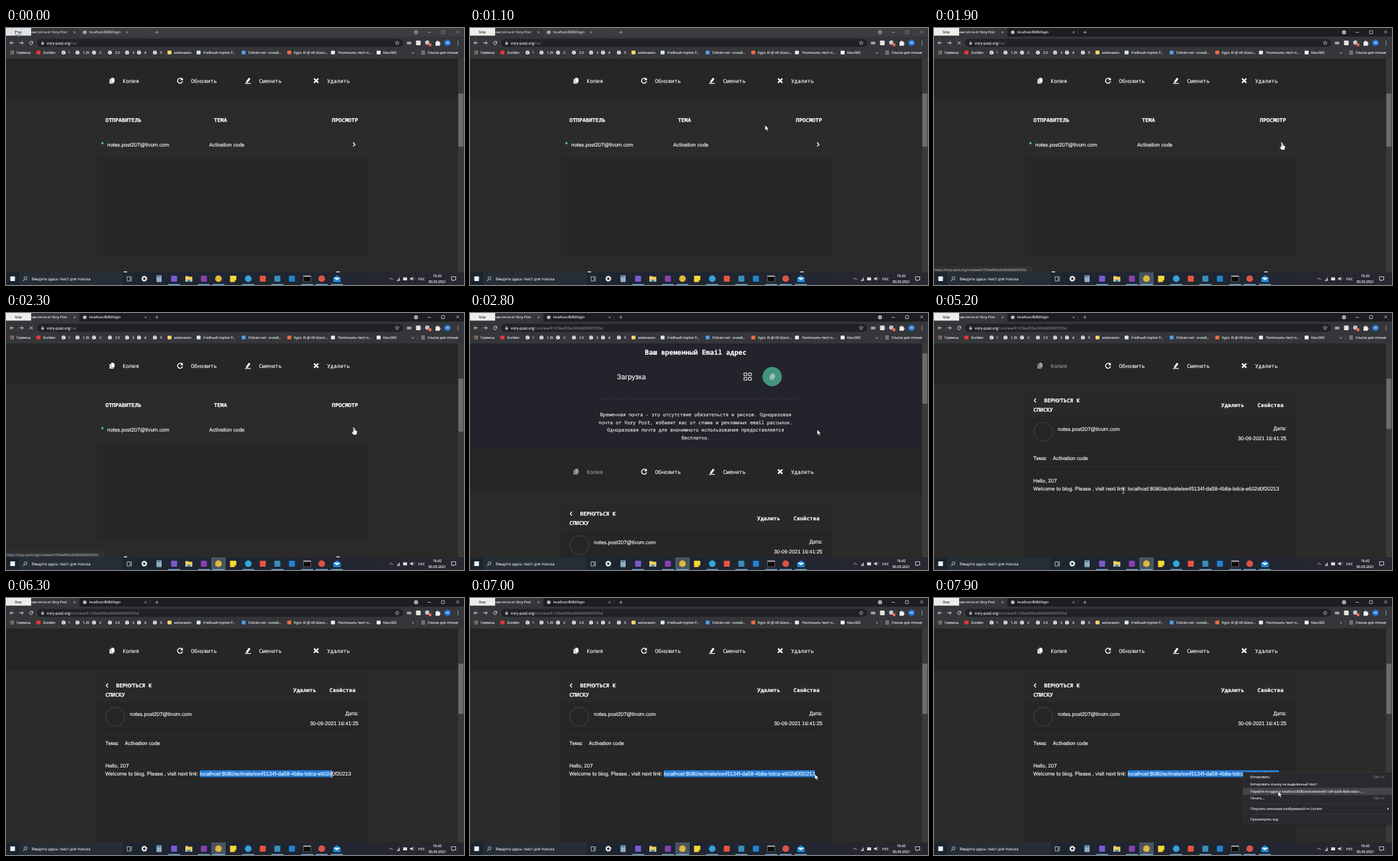
Write an HTML page that moves like this. It is 692x388 px and loops after 8 s.

```html
<!DOCTYPE html>
<html lang="ru">
<head>
<meta charset="utf-8">
<style>
html, body { margin: 0; width: 100%; height: 100%; overflow: hidden; background: #292928; }
svg { display: block; width: 692px; height: 388px; text-rendering: geometricPrecision; }
text { white-space: pre; }
.ui { font-family: "Open Sans", "Noto Sans", sans-serif; }
.mono { font-family: "Noto Sans Mono", "DejaVu Sans Mono", monospace; }
.sans { font-family: "Liberation Sans", Arial, sans-serif; }
</style>
</head>
<body>
<svg id="stage" viewBox="0 0 692 388"></svg>
<script>
const LOOP = 8000, ACTIVATE = 1700, LOADED = 2400, COPY_READY = 5900, MENU = 7500;
const VIEW = 'view/6155be850a365b003695355d';

const text = (font, size, fill, extra = '') => (x, y, str, more = '') =>
  `<text class="${font}" x="${x}" y="${y}" font-size="${size}" fill="${fill}" stroke="${fill}" stroke-width=".14" ${extra} ${more}>${str}</text>`;
const rect = (x, y, w, h, fill, r = 0, more = '') =>
  `<rect x="${x}" y="${y}" width="${w}" height="${h}" rx="${r}" fill="${fill}" ${more}/>`;
const dot = (x, y, r, fill, more = '') => `<circle cx="${x}" cy="${y}" r="${r}" fill="${fill}" ${more}/>`;
const line = (d, stroke = '#dfe1e5', w = 0.9, more = '') =>
  `<path d="${d}" fill="none" stroke="${stroke}" stroke-width="${w}" ${more}/>`;
const shape = (d, fill, more = '') => `<path d="${d}" fill="${fill}" ${more}/>`;
const group = (id, body, more = '') => `<g id="${id}" ${more}>${body}</g>`;
const cross = (x, y, r, color, w) =>
  line(`M${x - r} ${y - r}l${2 * r} ${2 * r}m0 ${-2 * r}l${-2 * r} ${2 * r}`, color, w);
const reload = (x, y, r, color, w) =>
  line(`M${x + r * .7} ${y - r * .7}A${r} ${r} 0 1 0 ${x + r} ${y + r * .2}`, color, w) +
  shape(`M${x + r * 1.1} ${y - r * 1.2}v${r * 1.1}h${-r * 1.1}z`, color);
const copyIcon = (x, y, color) =>
  shape(`M${x - 3.5} ${y - 2.5}h2v5.5h4v1.5h-6z`, color) +
  shape(`M${x - 1} ${y - 4.5}h3l2 2v5h-5z`, color);
const globe = (x, y) => dot(x, y, 3, '#eceef0') +
  line(`M${x - 2} ${y - 1.2}q1.6.2 1.6 1.6t1.4 1.6M${x + .4} ${y - 2.4}q.2 1.4 1.9 1.4`, '#4a4c50', .7);

const END = 'text-anchor="end"', MID = 'text-anchor="middle"';
const tab = text('ui', 5.05, '#e4e6e9');
const omni = text('ui', 5.75, '#e8eaed');
const mark = text('ui', 5, '#e8eaed');
const body = text('sans', 7.9, '#ffffff');
const head = text('mono', 8.2, '#ffffff', 'font-weight="700"');
const button = text('mono', 8.15, '#ffffff', 'font-weight="500"');
const item = text('ui', 5, '#e4e5e6');
const tray = text('ui', 5.3, '#f6f6f6');

function browser() {
  const bookmarks = [
    [49, 56, '#e33', 'Zuvideo'], [87, 94, '', '1'], [108, 116, '', '1.25'], [133, 141, '', '2'],
    [157, 165, '', '2.5'], [183, 191, '', '3'], [201, 209, '', '4'], [225, 233, '', '5'],
    [247, 254, '#f6d775', 'матанализ'], [291, 298, '#d9e4ef', 'Учебный портал Р...'],
    [359, 366, '#4a9cf0', 'Ostiven.net - онлай...'], [428, 435, '#e8703a', 'Курс: AI @ НК Школ...'],
    [494, 502, '#e9e9e9', 'Распознать текст о...'], [563, 570, '#f5f5f5', 'Kavu582']
  ];
  const apps = ['#e55', '#fb4', '#5b7', '#48e'];
  let s = rect(0, 0, 692, 14, '#1d1e21', 0, 'id="strip"') + rect(0, 0, 111, 14, '#35363a', 2) +
    rect(0, 13, 692, 33, '#35363a');
  s += group('tabs',
    tab(37, 8.2, 'ная почта от Vory-Post') + cross(103.5, 6.5, 1.5, '#ddd', .7) +
    dot(119, 6.5, 2.7, '#b9bcc0') + tab(126, 8.2, 'localhost:8080/login') +
    group('tabClose', cross(0, 6.5, 1.5, '#c8c8c8', .7)) +
    line('M217.5 3v7', '#55585d', .6) + line('M225.5 6.5h5m-2.5-2.5v5', '#ccc', .7));
  s += group('controls',
    dot(619.5, 6.5, 3, '#c9ccd0') + shape('M618 5.8h3l-1.5 2z', '#222') +
    line('M637 6.5h5M658 4h4.5v4.5h-4.5z', '#e6e6e6', .7) + cross(682.5, 6, 2.2, '#e6e6e6', .7));
  s += line('M12 22.5h-6m2.7-2.7l-2.7 2.7l2.7 2.7') + line('M20 22.5h6m-2.7-2.7l2.7 2.7l-2.7 2.7') +
    group('reload', reload(38, 22.5, 2.5, '#dfe1e5', .9)) + group('halt', cross(38, 22.5, 2.3, '#dfe1e5', .9)) +
    rect(47, 16.5, 553, 12, '#202124', 6) +
    rect(53.3, 21.8, 4, 3.4, '#aaa', .4) + line('M54.2 22v-1a1.1 1.1 0 0 1 2.2 0v1', '#aaa', .6) +
    omni(61.5, 24.7, 'vory-post.org<tspan fill="#9aa0a6" stroke="none">/ru/<tspan id="path"></tspan></tspan>') +
    line('M591 19.5l.9 2h2.1l-1.6 1.4l.6 2.1l-2-1.2l-2 1.2l.6-2.1l-1.6-1.4h2.1z', '#d8dadd', .6) +
    shape('M605.5 21.5q3.5-2 7 0v1.8l-1.4 1.7h-1.4l-.7-1.2l-.7 1.2h-1.4l-1.4-1.7z', '#a5a69f') +
    rect(619.5, 19, 7, 7, '#e4e4e1', 1) +
    dot(636.5, 22, 3.2, '#c5c8cc') + rect(638, 23, 5, 4.5, '#d63a38', 1) + tab(639.3, 26.9, '5') +
    shape('M649 20.5h2a1.2 1.2 0 0 1 2.4 0h2v2a1.2 1.2 0 0 1 0 2.4v1.8h-6.4z', '#f0f1f3') +
    dot(667, 22.5, 4.9, '#1e6fd0') + tab(667, 24.2, 'dd', MID);
  for (let i = 0; i < 3; i++) s += dot(683, 20 + i * 2.5, .65, '#ddd');
  for (let i = 0; i < 9; i++) s += rect(6.3 + i % 3 * 2.1, 34.3 + (i / 3 | 0) * 2.1, 1.5, 1.5, apps[i % 4]);
  s += mark(16, 38.9, 'Сервисы');
  for (const [x, tx, color, label] of bookmarks)
    s += (color ? rect(x - 3, 34.3, 6, 5.4, color, .8) : globe(x, 37)) + mark(tx, 38.9, label);
  return s + mark(613.5, 38.9, '»') + line('M622 33v8', '#5c5f64', .6) +
    line('M627.5 34.8h5.5m-5.5 2.2h5.5m-5.5 2.2h5.5', '#ddd', .8) + mark(637, 38.9, 'Список для чтения');
}

function toolbar() {
  return rect(0, 46, 683, 62, '#252525') + rect(142, 66, 396, 28, '#262626') +
    group('copy', copyIcon(160, 79.5, '#fff') + button(176.4, 82.5, 'Копия')) +
    reload(263, 79.5, 3.8, '#fff', 1.4) + button(279.4, 82.5, 'Обновить') +
    shape('M363 80.5l4-5.5l2.4 1.7l-4 5.5l-2.6 1z', '#fff') + line('M361 83.7h9', '#fff', 1.1) +
    button(382.2, 82.5, 'Сменить') +
    cross(468.7, 79.5, 3.3, '#fff', 2.2) + button(485.2, 82.5, 'Удалить');
}

function inbox() {
  return rect(0, 108, 683, 262, '#2a2a29') + rect(138, 195, 410, 150, '#272727') +
    line('M142 119.5h403', '#3a3a39', .6, 'stroke-dasharray="2 2"') +
    head(150.3, 141.7, 'ОТПРАВИТЕЛЬ') + head(314.3, 141.7, 'ТЕМА') + head(492.5, 141.7, 'ПРОСМОТР') +
    rect(142, 157, 403, 38, '#2b2b2a') + rect(144, 172.3, 3.3, 3.3, '#4bb79f', 1) +
    body(153, 178.8, 'notes.post207@tivum.com') + body(307, 178.8, 'Activation code') +
    line('M524.4 172.7l3 3l-3 3', '#fff', 1.3) +
    line('M142 345.5h403', '#343433', .6) + rect(178, 367.5, 5, 2, '#ddd') + rect(499, 367.5, 5, 2, '#ddd');
}

function message() {
  return rect(0, 108, 683, 262, '#2b2b29') + rect(137, 112, 410, 258, '#292928') + rect(137, 157, 410, 213, '#262627') +
    line('M154 129l-2.6 3l2.6 3', '#fff', 1.2) + head(166.3, 134.8, 'ВЕРНУТЬСЯ К') + head(150.3, 148.8, 'СПИСКУ') +
    head(434, 141.8, 'Удалить') + head(488.8, 141.8, 'Свойства') +
    dot(165, 179.3, 14.3, '#252526', 'stroke="#4a4a4a" stroke-width=".9"') +
    body(187, 177.8, 'notes.post207@tivum.com') + body(532.5, 177, 'Дата:', END) +
    body(532.5, 191.8, '30-09-2021 16:41:25', END) +
    line('M150 207.5h383M150 232.5h383', '#343434', .7) +
    body(150, 222.4, 'Тема:') + body(179.5, 222.4, 'Activation code') + body(150, 255.7, 'Hello, 207') +
    rect(293, 260, 0, 10.5, '#1f78d6', 0, 'id="selection"') +
    body(150, 267.6, 'Welcome to blog. Please , visit next link: localhost:8080/activate/ee45134f-da58-4b8a-bdca-e602d0f20213');
}

function hero() {
  const small = text('mono', 7.2, '#f0f0ec', MID);
  const title = text('mono', 10.25, '#fff', 'font-weight="700" ' + MID);
  const copyLines = [
    'Временная почта - это отсутствие обязательств и рисков. Одноразовая',
    'почта от Vory Post, избавит вас от спама и рекламных email рассылок.',
    'Одноразовая почта для анонимного использования предоставляется', 'бесплатно.'
  ];
  let s = rect(0, 46, 683, 160, '#23232c') + title(341, 63, 'Ваш временный Email адрес') +
    text('sans', 10.8, '#fff')(222, 99.6, 'Загрузка');
  for (const [x, y] of [[414, 90.5], [420.8, 90.5], [414, 97.3], [420.8, 97.3]])
    s += rect(x, y, 4.2, 4.2, 'none', .6, 'stroke="#eee" stroke-width="1.1"');
  s += dot(456.5, 96, 14.6, '#43947d') + copyIcon(456.5, 96, '#a9c9bd') +
    line('M195 130h300', '#41414a', .7, 'stroke-dasharray="5 3"');
  copyLines.forEach((str, i) => s += small(341, 155.7 + i * 11.8, str));
  return s;
}

function taskbar() {
  const icons = [
    [254, '#7a5bd0'], [299, '#8a3fb0'], [321, '#e0b83c', 1], [366, '#35a4de', 1], [388, '#e8553a'],
    [410, '#3a8fb8'], [432, '#2483d0'], [477, '#dc5543', 1]
  ];
  let s = '<linearGradient id="bar"><stop stop-color="#1a2530"/><stop offset=".65" stop-color="#202631"/>' +
    '<stop offset="1" stop-color="#2a2730"/></linearGradient>' +
    rect(0, 369, 692, 19, 'url(#bar)') + rect(20, 369, 156, 19, '#262d36') + rect(6.5, 375, 7, 7, '#f4f4f4') +
    dot(29.5, 377.8, 2.3, 'none', 'stroke="#ddd" stroke-width=".8"') + line('M28 379.8l-2.3 2.3', '#ddd', .9) +
    text('ui', 5.8, '#d0d3d6')(39, 380.8, 'Введите здесь текст для поиска') +
    line('M183 375.5h4.5v6.5h-4.5zM189.5 375v7.5', '#ddd', .8) +
    dot(209, 378.5, 2.8, 'none', 'stroke="#fff" stroke-width="1.8"') +
    dot(209, 378.5, 4, 'none', 'stroke="#fff" stroke-width="1" stroke-dasharray="1.57 1.57"') +
    rect(310, 369, 22, 19, '#485462', 0, 'id="focus"');
  for (const [x, color, round] of icons)
    s += round ? dot(x, 378.5, 5, color) : rect(x - 4.5, 374, 9, 9, color, 1);
  // calculator, folder, note, console, mail
  s += rect(227.5, 373.5, 7.5, 10, '#a9c4d8', .5) + rect(228.5, 374.5, 5.5, 2, '#3c6f9c') +
    line('M228.7 378.5h5.5M228.7 380.5h5.5M228.7 382.3h5.5', '#4c6d87', .8, 'stroke-dasharray="1.2 .8"') +
    shape('M271 374.5h4l1 1h5.5v7.5h-10.500z', '#f4cd62') + rect(273.5, 380, 5.500, 3, '#3f92d6') +
    shape('M338.500 374h9.500v6l-3 3.500h-6.500z', '#f8d636') + shape('M348 380h-3v3.500z', '#b99b1c') +
    rect(449.5, 374, 11, 9, '#0c0c0c', 0, 'stroke="#9a9a9a" stroke-width=".5"') + rect(449.5, 374, 11, 1.5, '#c4c4c4') +
    shape('M494.5 377l5.500-3.500l5.500 3.500v6.500h-11z', '#1f8fe4') + shape('M495 377h10l-5 3.800z', '#f2f8fd');
  for (const x of [254, 299, 321, 366, 410, 455, 477, 500]) s += rect(x - 9, 386.7, 18, 1.3, '#76b4e4');
  return s + line('M579.5 380l2.5-2.5l2.5 2.5', '#eee', .8) + shape('M590 382l5-6v6z', '#aaa') +
    rect(600, 376.5, 6, 4.5, '#ddd') + shape('M610.5 377.5h2l2-2v6l-2-2h-2z', '#eee') +
    line('M616 376.3a3 3 0 0 1 0 4.5', '#aaa', .7) + tray(623, 380.6, 'РУС') +
    tray(651.5, 376.3, '16:42', MID) + tray(651.5, 385.2, '30.09.2021', MID) +
    line('M673 375.5h6.5v5h-2.5l-1.5 1.7v-1.7h-2.5z', '#eee', .8);
}

function contextMenu() {
  const key = text('ui', 5, '#85878b', END);
  return rect(468, 264.5, 224, 79, '#000', 0, 'opacity=".3"') +
    rect(467, 263, 225, 79, '#292a2d', 0, 'stroke="#3c3d40" stroke-width=".5"') +
    rect(467, 286.5, 225, 11, '#434447', 0, 'id="hover"') +
    item(478, 271.8, 'Копировать') + key(681, 271.8, 'Ctrl + C') +
    item(478, 282.7, 'Копировать ссылку на выделенный текст') +
    item(478, 293.6, 'Перейти по адресу localhost:8080/activate/ee45134f-da58-4b8a-bdca- ...') +
    item(478, 304.4, 'Печать...') + key(681, 304.4, 'Ctrl + P') +
    line('M467 310.5h225M467 326.5h225', '#3f4043', .6) +
    item(478, 320.2, 'Получать описания изображений от Lumero') + shape('M685 316.3l2.2 2l-2.2 2z', '#ddd') +
    item(478, 336.2, 'Просмотреть код');
}

const cursors =
  group('arrow', shape('M0 0v8l1.9-1.7l1.4 3l1.4-.7l-1.4-2.8h2.6z', '#fff', 'stroke="#111" stroke-width=".5"')) +
  group('hand', shape('M-.8.6Q0-.6.8.6v3.2l3.6.9q.9.3.8 1.3l-.6 3.2l-.8 1.8h-4.4l-2.8-4q-.2-1.2 1-.9l1.6 1.2z', '#fff', 'stroke="#222" stroke-width=".5"')) +
  group('beam', line('M-1.7-4h1.3l.4.4l.4-.4h1.3M0-3.6v7.2M-1.7 4h1.3l.4-.4l.4.4h1.3', '#e8e8e8', .8));

document.getElementById('stage').innerHTML =
  '<clipPath id="page"><rect y="46" width="692" height="323"/></clipPath>' +
  `<g clip-path="url(#page)">${group('inbox', inbox())}${group('message', message())}` +
  `${group('toolbar', toolbar())}${group('hero', hero())}` +
  rect(683, 46, 9, 324, '#3a3a3a') + rect(683.5, 99, 7.5, 80, '#6c6c6c', 0, 'id="thumb"') +
  '</g>' + browser() +
  group('status', rect(0, 359.5, 149, 10, '#303134') + text('ui', 5, '#a4a7ab')(1, 366.6, 'https://vory-post.org/ru/' + VIEW)) +
  taskbar() + group('menu', contextMenu()) +
  rect(0, 0, 38, 11.5, '#ededeb', 0, 'id="stop"') + text('ui', 5, '#333', MID)(18.5, 7.5, 'Stop') +
  group('cursor', cursors);

const el = id => document.getElementById(id);
const set = (id, name, value) => el(id).setAttribute(name, value);
const show = (id, on) => set(id, 'visibility', on ? 'visible' : 'hidden');
const move = (id, x, y) => set(id, 'transform', `translate(${x} ${y})`);
const ease = p => { p = Math.min(1, Math.max(0, p)); return p * p * (3 - 2 * p); };

// time, x, y of the pointer's hot spot
const route = [
  [0, 15, 4], [200, 15, 4], [1400, 525.5, 173], [2300, 525.5, 173], [2500, 524.5, 176], [3300, 524.5, 176],
  [3800, 449, 267], [4200, 449, 267], [5000, 286, 268], [5400, 286, 268], [5600, 293, 267], [6500, 521, 266],
  [7100, 521, 266], [7400, 467, 263], [7500, 467, 263], [7800, 520, 292], [8000, 520, 292]
];
function pointer(t) {
  const i = route.findIndex((k, n) => n && t < k[0]);
  const [t0, x0, y0] = route[i - 1], [t1, x1, y1] = route[i];
  const p = ease((t - t0) / (t1 - t0));
  return [x0 + (x1 - x0) * p, y0 + (y1 - y0) * p];
}

function draw(t) {
  const active = t >= ACTIVATE, loaded = t >= LOADED;
  const top = loaded ? 1 - ease((t - 2850) / 500) : 0;
  const [x, y] = pointer(t);

  set('strip', 'fill', active ? '#1d1e21' : '#3c3d41');
  set('tabs', 'opacity', active ? 1 : .85);
  set('controls', 'opacity', active ? 1 : .6);
  move('tabClose', active ? 211 : 183, 0);
  show('focus', active);
  show('halt', active && !loaded);
  show('reload', !active || loaded);
  el('path').textContent = loaded ? VIEW : '';
  show('status', t >= 1400 && !loaded);
  set('stop', 'fill', t < 300 ? '#dfe4e8' : '#ededeb');

  show('inbox', !loaded);
  show('message', loaded);
  show('hero', loaded);
  move('message', 0, 171 * top);
  move('toolbar', 0, 160 * top);
  move('hero', 0, 160 * (top - 1));
  set('thumb', 'y', 99 - 38 * top);
  set('thumb', 'height', loaded ? 76 : 80);
  set('copy', 'opacity', loaded && t < COPY_READY ? .55 : 1);
  set('selection', 'width', t < 5600 ? 0 : t >= 6500 ? 228 : Math.max(0, x - 293));

  show('menu', t >= MENU);
  show('hover', t >= MENU && y > 286);
  const kind = t >= 1400 && t < LOADED ? 'hand' : t >= 3700 && t < 6500 ? 'beam' : 'arrow';
  for (const id of ['arrow', 'hand', 'beam']) show(id, id === kind);
  move('cursor', x, y);
}

const start = performance.now();
function tick() {
  const t = (performance.now() - start) % LOOP;
  draw(Math.floor(t / 100) * 100);
  requestAnimationFrame(tick);
}
tick();
</script>
</body>
</html>
```
